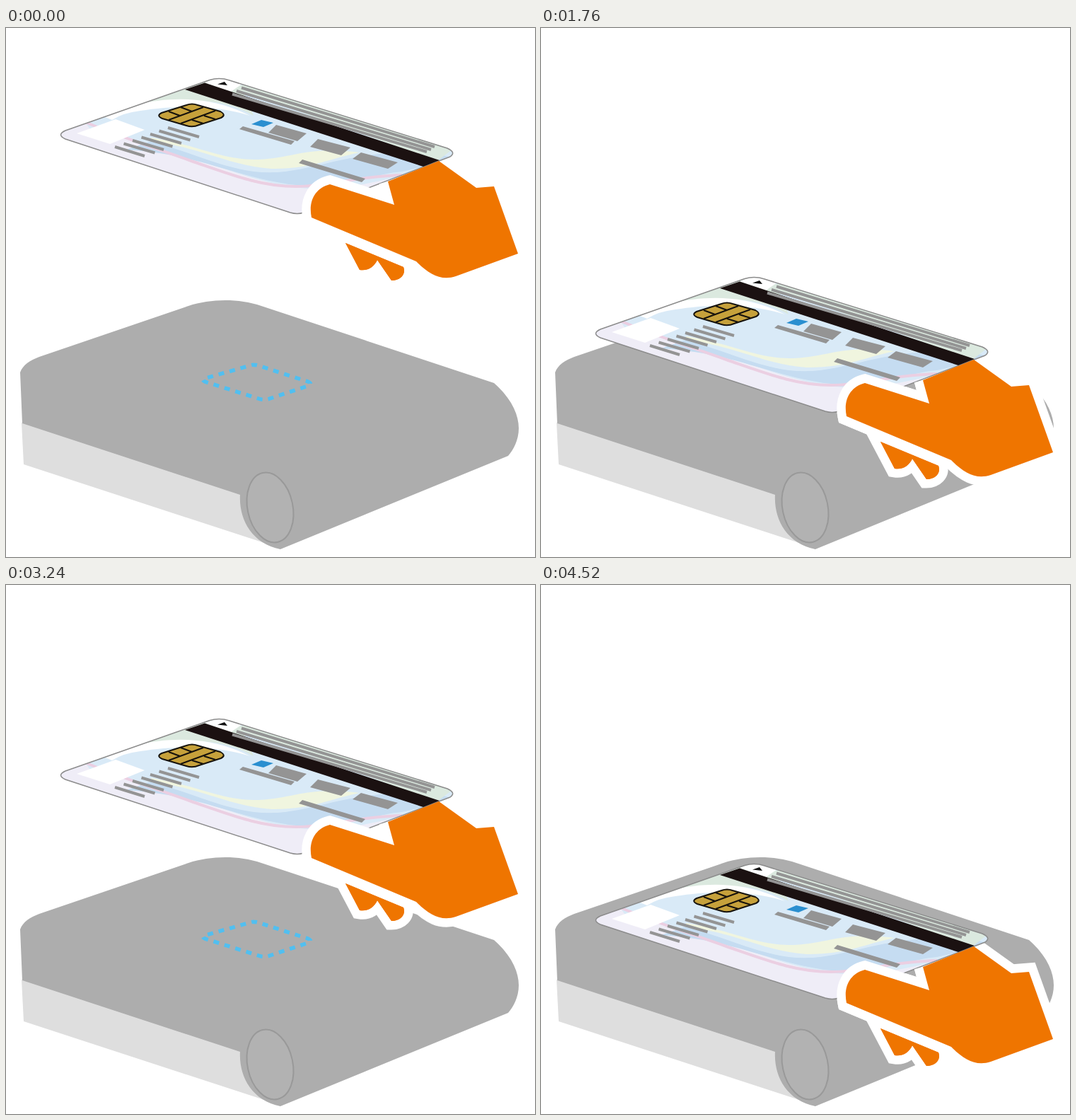
Write an HTML page that moves like this. It is 748 px wide and 748 px high and loops after 5 s.

```html
<!DOCTYPE html>
<html lang="en">
<head>
<meta charset="utf-8">
<title>Card on reader</title>
<style>
html, body { margin: 0; width: 100%; height: 100%; overflow: hidden; background: #fff; }
svg { display: block; width: 100%; height: 100%; }
.halo { fill: #fff; stroke: #fff; stroke-width: 25; }
.thumb-halo { fill: none; stroke: #fff; stroke-width: 25; }
.skin { fill: #ef7500; }
.grey { fill: #949494; }
.rules { fill: none; stroke: #949494; stroke-width: 4; }

/* The picture advances every 40 ms; each segment is linear in such steps. */
.mover { animation: lower 5s -1ms infinite; }
@keyframes lower {
  0%    { transform: translateY(0); animation-timing-function: step-end; }
  .8%   { transform: translateY(0); animation-timing-function: steps(13); }
  11.2% { transform: translateY(86px); animation-timing-function: steps(14); }
  22.4% { transform: translateY(176px); animation-timing-function: steps(2); }
  24%   { transform: translateY(188px); animation-timing-function: steps(12); }
  33.6% { transform: translateY(269px); animation-timing-function: steps(9); }
  40.8% { transform: translateY(323px); animation-timing-function: step-end; }
  50.4% { transform: translateY(0); animation-timing-function: steps(13); }
  60.8% { transform: translateY(86px); animation-timing-function: steps(5); }
  64.8% { transform: translateY(118px); animation-timing-function: steps(9); }
  72%   { transform: translateY(173px); animation-timing-function: steps(10); }
  80%   { transform: translateY(237px); animation-timing-function: steps(4); }
  83.2% { transform: translateY(263px); animation-timing-function: steps(9); }
  90.4%, 100% { transform: translateY(323px); }
}
</style>
</head>
<body>
<svg viewBox="0 0 748 748">
  <defs>
    <path id="hand" d="M458 221L549 250L540 217L612 188L665 226L690 224L724 319L636 351C615 358 598 348 580 330L432 268C427 244 438 226 458 221Z"/>
    <path id="fingers" d="M480 304L562 338C566 349 557 357 545 357L525 328C521 337 512 344 500 342Z"/>
    <path id="card" d="M84 145L288 73.500Q302 69.500 316 74L624 170Q637 176 628 182L421 261Q412 264 402 261L84 157Q71 151 84 145Z"/>
    <clipPath id="card-clip"><use href="#card"/></clipPath>
  </defs>

  <g id="reader">
    <path fill="#dedede" d="M22 558L332 659L388 737L362 727L25 617Z"/>
    <path fill="#adadad" d="M20 487C24 476 34 470 47 465L258 393C289 383 328 382 361 393L690 502C714 523 725 546 725 566C725 583 717 597 710 605L388 737C347 729 329 694 331 660L23 559Z"/>
    <ellipse cx="373.500" cy="678" rx="32" ry="50" transform="rotate(-12 373.500 678)" fill="#b2b2b2" stroke="#999" stroke-width="2"/>
    <path fill="none" stroke="#51bff0" stroke-width="5.500" pathLength="20" stroke-dasharray=".5 .5" stroke-dashoffset=".25" d="M351 476.500Q354 476 359 478L427 500Q434 503 427 506L373 524Q365 527 357 524L284 501Q275 498 281 495.500L346 477Q349 476 351 476.500Z"/>
  </g>

  <g class="mover">
    <use href="#hand" class="halo"/>
    <use href="#fingers" class="halo"/>
    <use href="#fingers" class="skin"/>

    <g clip-path="url(#card-clip)">
      <use href="#card" fill="#efedf7"/>
      <path fill="#d9eaf7" d="M110 130L300 60L650 170L600 205C530 208 480 240 390 222C310 207 240 165 120 145Z"/>
      <path fill="#c5dcf1" d="M205 160C290 185 330 210 395 203C450 196 500 172 600 176L640 185L560 203C520 206 470 229 400 221C320 209 270 178 170 172Z"/>
      <path fill="#f0f5df" d="M205 155C270 165 300 185 350 186C405 186 420 166 500 176C460 184 430 200 375 199C320 196 280 170 205 160Z"/>
      <path fill="#dbe9df" d="M180 109L300 66L330 78L350 124C310 100 260 98 180 109Z"/>
      <path fill="#fff" d="M140 126L185 108C235 97 290 96 345 124C290 107 235 110 190 117Q165 120 150 130Z"/>
      <path fill="#dbe9df" d="M320 84L345 78L632 171L610 188Z"/>
      <path fill="#fff" d="M281 77L302 69L334 79L318 90Z"/>
      <path fill="none" stroke="#ebcfe2" stroke-width="4" d="M105 130C150 150 200 166 262 188C320 208 360 224 410 224C460 224 490 210 560 208"/>
      <path fill="#fff" d="M100 149L155 129L196 144L147 164Z"/>
    </g>
    <use href="#card" fill="none" stroke="#8c8c8c" stroke-width="1.500"/>

    <path fill="#1b1111" d="M253 87L281 77.500L613 187L590 196Z"/>
    <path fill="#111" d="M299 79.500L309 76L313 81Z"/>
    <path class="rules" d="M333 84.500L606 168M326 89L601 172M320 93.500L595 175"/>
    <path class="rules" d="M229 141l44 13M216.500 145.500l44 13M204 150l44 13M191.500 154.500l44 13M179 159l44 13M166.500 163.500l44 13M154 168l42 13"/>

    <g stroke="#16120c" stroke-width="2" stroke-linejoin="round">
      <path fill="#c6a13b" d="M220 120L255 109Q263 106 271 109L303 118Q312 123 304 127L273 137Q264 141 255 138L221 128Q212 124 220 120Z"/>
      <path fill="none" d="M230 130L279 112M247 135L296 117M230 118L246 124M247 112L263 118M263 130L279 135M280 124L296 129"/>
    </g>

    <path fill="#2a8fd0" d="M347 136L361 130L378 134L364 140Z"/>
    <path class="grey" d="M382 137L425 149L412 160L371 148ZM441 157L487 169L474 180L430 168ZM502 176L554 190L540 199L490 185ZM335 139L408 160L403 165L330 143ZM419 186L508 213L503 218L414 191Z"/>

    <path class="thumb-halo" d="M540 217L549 250L458 221C438 226 427 244 432 268L580 330"/>
    <use href="#hand" class="skin"/>
    <use href="#fingers" class="skin"/>
  </g>
</svg>
</body>
</html>
```
